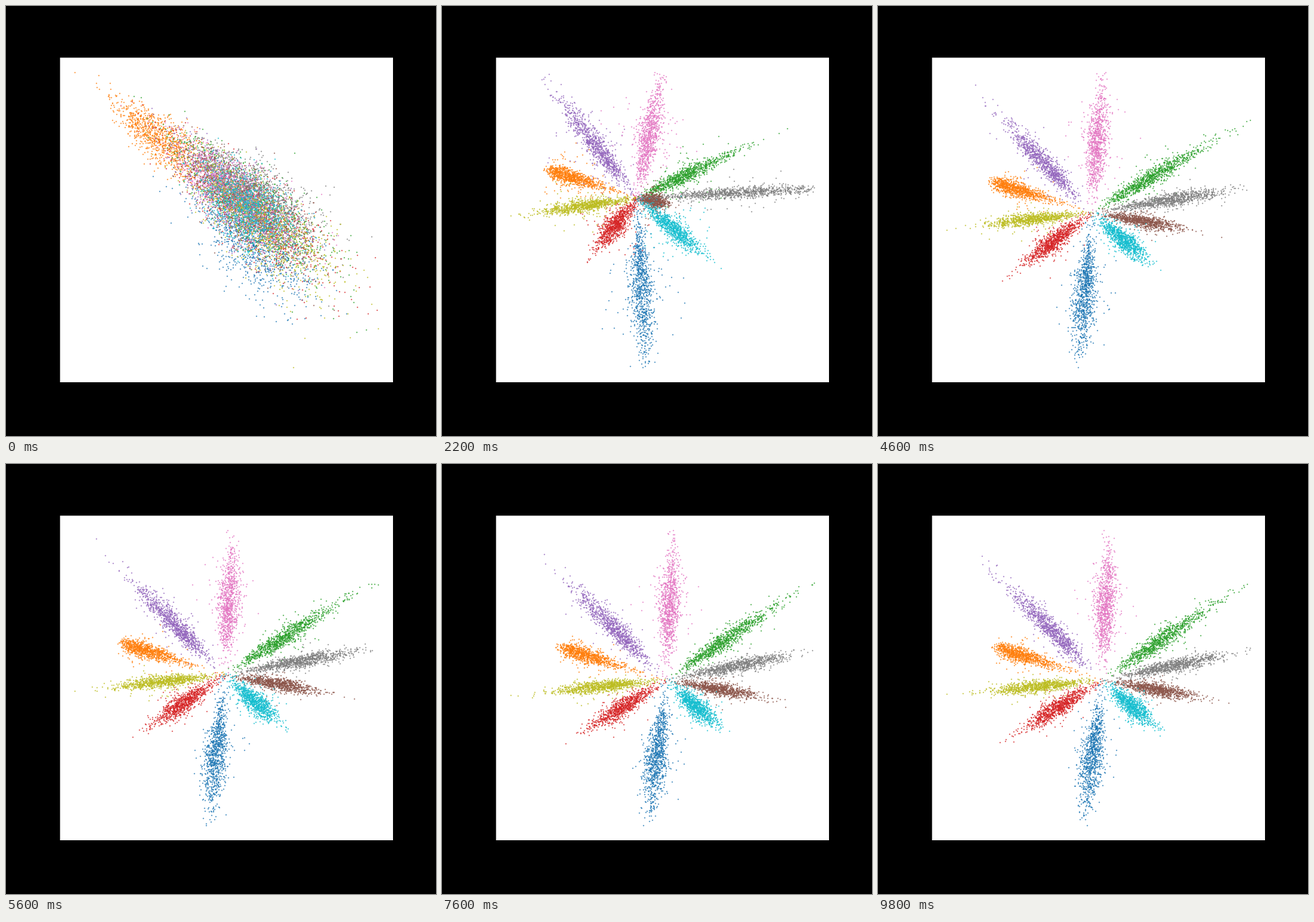
An HTML page with a canvas for the animation above (10 s loop, 720x720 px).

```html
<!DOCTYPE html>
<html lang="en">
<head>
<meta charset="utf-8">
<title>Scatter</title>
<style>
  html, body { margin: 0; width: 100%; height: 100%; overflow: hidden; background: #000; }
  canvas { display: block; width: 720px; height: 720px; }
</style>
</head>
<body>
<canvas id="stage" width="720" height="720"></canvas>
<script>
const ctx = document.getElementById('stage').getContext('2d');
const STEP = 200, STEPS = 50, COUNT = 1000;
const BOUNDS = { left: 115, right: 623, top: 111, bottom: 605 };
const BLOB = { x: 400, y: 335, tilt: 0.71 };
const OPEN = 11; // step at which the star has unfolded

// blob: mean along and across the tilt; reach: spread along it
// aim: ray centre as a share of the room between hub and bounds
// turn, size: rotation in degrees and scale of a young ray
const classes = [
  { color: '#1f77b4', blob: [56, 37], aim: [-0.06, 0.52], turn: -8 },
  { color: '#ff7f0e', blob: [-183, 8], reach: 45, aim: [-0.51, -0.165], spread: 0.21, skew: -0.15 },
  { color: '#2ca02c', blob: [0, -13], reach: 84, aim: [0.4, -0.267], size: 0.68, spread: 0.4, skew: 0.1 },
  { color: '#d62728', blob: [18, -2], reach: 84, aim: [-0.285, 0.19], turn: -9, size: 0.72 },
  { color: '#9467bd', blob: [-27, -6], aim: [-0.34, -0.35], turn: 6, size: 1.1, skew: 0.08 },
  { color: '#8c564b', blob: [-12, -2], aim: [0.367, 0.065], size: 0.25 },
  { color: '#e377c2', blob: [-30, -4], aim: [0.024, -0.486], turn: 7 },
  { color: '#7f7f7f', blob: [12, -25], aim: [0.476, -0.095], turn: 5, size: 1.15 },
  { color: '#bcbd22', blob: [36, 2], reach: 80, aim: [-0.41, 0.045] },
  { color: '#17becf', blob: [2, 0], reach: 48, aim: [0.2, 0.177] }
];

const hubPath = [
  { step: OPEN, at: [327, 322] },
  { step: 18, at: [333, 375] },
  { step: 23, at: [358, 346] },
  { step: 34, at: [375, 362] }
];

const mix = (a, b, k) => a + (b - a) * k;
const mixAll = (a, b, k) => a.map((v, i) => mix(v, b[i], k));
const clamp = (v, low, high) => Math.min(high, Math.max(low, v));

function rotate(x, y, angle) {
  const c = Math.cos(angle), s = Math.sin(angle);
  return [x * c - y * s, x * s + y * c];
}

function randomizer(seed) {
  return () => {
    seed = (seed + 0x6D2B79F5) | 0;
    let n = Math.imul(seed ^ (seed >>> 15), 1 | seed);
    n = (n + Math.imul(n ^ (n >>> 7), 61 | n)) ^ n;
    return ((n ^ (n >>> 14)) >>> 0) / 4294967296;
  };
}

function normal(rnd) {
  return Math.sqrt(-2 * Math.log(1 - rnd())) * Math.cos(2 * Math.PI * rnd());
}

const baseRnd = randomizer(41);
const samples = classes.map(() => Array.from({ length: COUNT }, () => ({
  along: normal(baseRnd),
  across: normal(baseRnd),
  stray: baseRnd() < 0.08 ? 1 : 0
})));

function hubAt(step) {
  let i = 0;
  while (i < hubPath.length - 2 && step > hubPath[i + 1].step) i++;
  const a = hubPath[i], b = hubPath[i + 1];
  return mixAll(a.at, b.at, clamp((step - a.step) / (b.step - a.step), 0, 1));
}

// Signed share of the way from the hub to the bounds, and back to pixels
const roomX = (hub, dx) => dx < 0 ? hub[0] - BOUNDS.left : BOUNDS.right - hub[0];
const roomY = (hub, dy) => dy < 0 ? hub[1] - BOUNDS.top : BOUNDS.bottom - hub[1];

// The blob is a wedge: narrow at its upper left, wide at its lower right
function blobPoint({ blob, reach = 62 }, s) {
  const u = blob[0] + reach * s.along;
  const v = blob[1] + s.across * clamp(26 + 0.055 * u, 8, 36);
  const [dx, dy] = rotate(u, v, BLOB.tilt);
  return [BLOB.x + dx, BLOB.y + dy];
}

function makeRay({ aim, turn = 0, size = 1, spread = 0.35, skew = 0.02 }, hub, youth) {
  const [dx, dy] = rotate(
    aim[0] * roomX(hub, aim[0]), aim[1] * roomY(hub, aim[1]), turn * youth * Math.PI / 180);
  const scale = mix(1, size, youth);
  const radius = Math.hypot(dx, dy);
  const width = 4.4 + 4.4 * Math.abs(dy) / radius;
  return (s, rnd) => {
    const g = 0.95 * s.along + 0.31 * normal(rnd);
    const h = 0.92 * s.across + 0.39 * normal(rnd);
    const t = scale * Math.abs(1 + spread * (1 + 0.15 * youth) * (g + skew * (g * g - 1)));
    const taper = Math.min(1.15, 0.45 + 0.55 * t / scale) / (1 + 0.12 * Math.max(0, g) ** 2);
    const v = width * h * taper * (1 + s.stray * (1.3 + 1.5 * youth)) / radius;
    return [hub[0] + dx * t - dy * v, hub[1] + dy * t + dx * v];
  };
}

// Folds strays back inside the axis range and stretches the extremes to it
function fit(points, hub) {
  const { left, right, top, bottom } = BOUNDS;
  for (const p of points) {
    const dx = p[0] - hub[0], dy = p[1] - hub[1];
    const over = Math.max(Math.abs(dx) / roomX(hub, dx), Math.abs(dy) / roomY(hub, dy));
    if (over > 1) {
      p[0] = hub[0] + dx / over ** 2;
      p[1] = hub[1] + dy / over ** 2;
    }
  }
  const extreme = (axis, sign) => points.reduce((a, b) => sign * b[axis] > sign * a[axis] ? b : a);
  extreme(0, -1)[0] = left;
  extreme(0, 1)[0] = right;
  extreme(1, -1)[1] = top;
  extreme(1, 1)[1] = bottom;
}

function draw(step) {
  const hub = hubAt(step);
  const opened = 1 - (1 - Math.min(1, step / OPEN)) ** 3;
  const youth = Math.exp(-Math.max(0, step - OPEN) / 7);
  const rnd = randomizer(900 + step);
  const groups = classes.map((c, i) => {
    const ray = makeRay(c, hub, youth);
    return samples[i].map(s => mixAll(blobPoint(c, s), ray(s, rnd), opened));
  });
  fit(groups.flat(), mixAll([BLOB.x, BLOB.y], hub, opened));

  ctx.fillStyle = '#000';
  ctx.fillRect(0, 0, 720, 720);
  ctx.fillStyle = '#fff';
  ctx.fillRect(90.5, 86.5, 557.5, 543.5);
  groups.forEach((points, i) => {
    ctx.fillStyle = classes[i].color;
    ctx.beginPath();
    for (const [px, py] of points) {
      const x = Math.floor(px) + 0.5, y = Math.floor(py) + 0.5;
      ctx.moveTo(x + 1, y);
      ctx.arc(x, y, 1, 0, 2 * Math.PI);
    }
    ctx.fill();
  });
}

let shown = -1;
function tick() {
  const step = Math.floor(performance.now() / STEP) % STEPS;
  if (step !== shown) draw(shown = step);
  requestAnimationFrame(tick);
}
tick();
</script>
</body>
</html>
```
